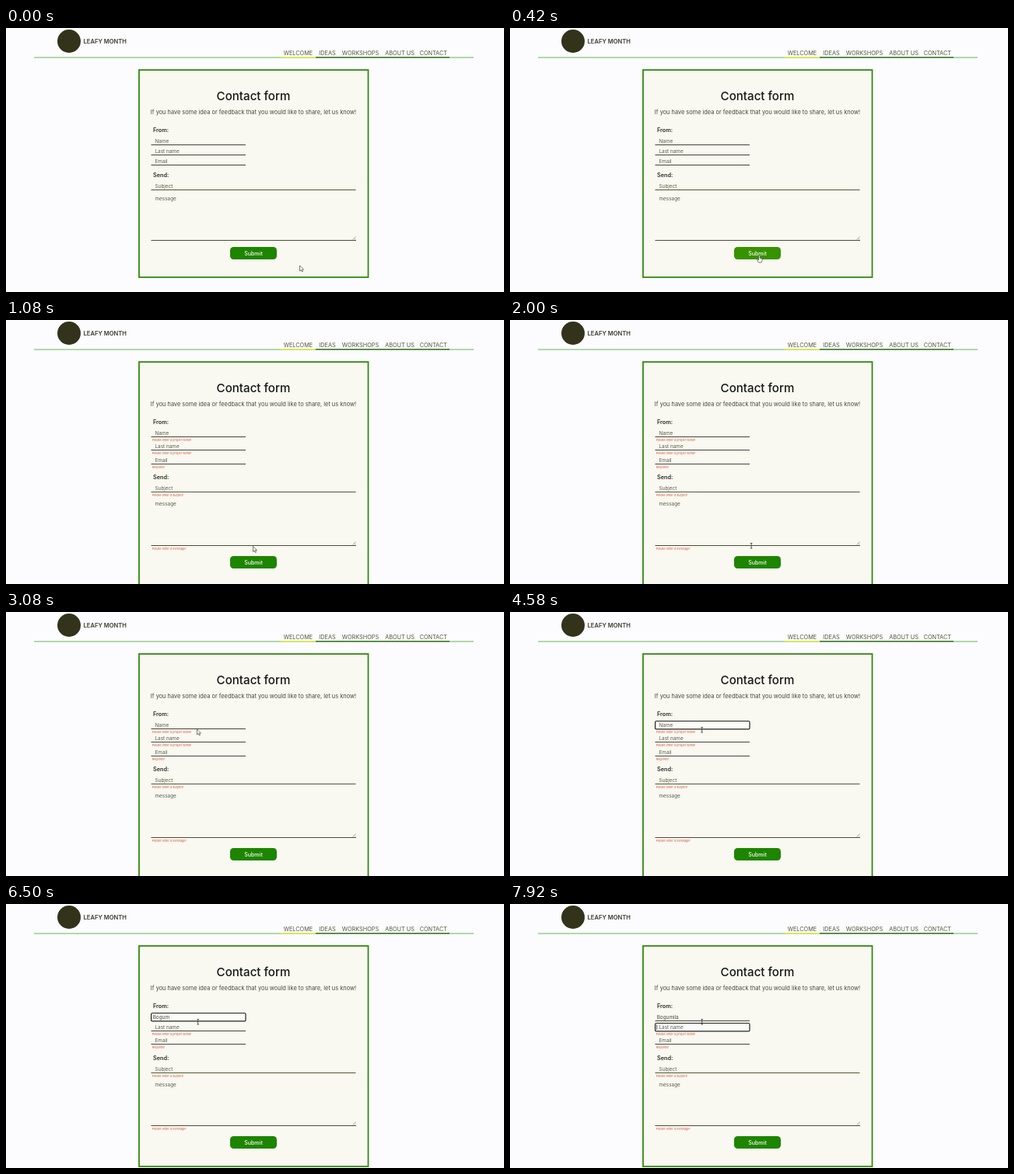
Write an HTML page that moves like this. It is 640 px wide and 340 px high and loops after 8 s.

```html
<!DOCTYPE html>
<html lang="en">
<head>
<meta charset="utf-8">
<title>Contact form</title>
<style>
  html, body { margin: 0; width: 100%; height: 100%; overflow: hidden; background: #fcfcfe; }
  svg { display: block; width: 640px; height: 340px; font-family: Inter, "Open Sans", sans-serif; }
  text { dominant-baseline: central; white-space: pre; }
</style>
</head>
<body>
<svg viewBox="0 0 640 340">
  <circle cx="81" cy="17" r="15" fill="#33331c"/>
  <text x="99.5" y="17.5" font-size="7.6" font-weight="600" fill="#3a3a30">LEAFY MONTH</text>
  <path d="M36 38H601" stroke="#6ab55c" stroke-width="1.2"/>
  <path d="M353 37.7H398" stroke="#e0f03c" stroke-width="1.6"/>
  <path d="M398 37.7H570" stroke="#3f7a2a" stroke-width="1.4"/>
  <g id="nav" font-size="7.3" fill="#55553c"></g>
  <g id="form"></g>
</svg>
<script>
const LOOP = 8000;
const ERROR_HEIGHT = 4.3;
const SUBMIT = 910, FOCUS_NAME = 3990, VALID = 5320, FOCUS_LAST = 7570;
const NAME = 'Bogumila';
const KEYS = [5160, 5320, 5570, 5820, 6490, 6660, 6740, 6820];

// time, x, y of the pointer
const PATH = [
  [0, 377.5, 306], [80, 377.5, 306], [400, 320.5, 293], [920, 317.5, 291.5],
  [1500, 317.5, 291.5], [1800, 316, 306], [2250, 302, 262], [2580, 286, 224],
  [2830, 286, 224], [3080, 245.5, 151], [3580, 245.5, 151], [3830, 246.7, 148.5],
  [LOOP, 246.7, 148.5]
];

const text = (x, y, str, size, fill, more = '') =>
  `<text x="${x}" y="${y}" font-size="${size}" fill="${fill}" ${more}>${str}</text>`;
const line = (x1, x2, y, color) =>
  `<path d="M${x1} ${y}H${x2}" stroke="${color}" stroke-width="1.2"/>`;
const snap = y => Math.floor(y) + .5;
const middle = 'text-anchor="middle"';
const strong = 'font-weight="600"';

document.getElementById('nav').innerHTML = [
  [375.5, 'WELCOME'], [413, 'IDEAS'], [455.5, 'WORKSHOPS'], [506, 'ABOUT US'], [549.3, 'CONTACT']
].map(([x, label]) => `<text x="${x}" y="32.7" ${middle}>${label}</text>`).join('');

function pointer(t) {
  const i = Math.max(1, PATH.findIndex(p => p[0] > t));
  const [t0, x0, y0] = PATH[i - 1], [t1, x1, y1] = PATH[i];
  const k = (t - t0) / (t1 - t0), ease = k * k * (3 - 2 * k);
  return [x0 + (x1 - x0) * ease, y0 + (y1 - y0) * ease];
}

function cursor(x, y, kind) {
  const shape = {
    arrow: '<path d="M0 0V7L1.7 5.5 2.9 8 4 7.5 2.9 5.1H5Z" fill="#fff" stroke="#444" stroke-width=".7"/>',
    hand: '<path d="M-.8 .6Q0-.5 .8 .6V3.4L3.6 4.2V6.5L2.6 9H-1L-3 5.8Q-2.7 4.6-.8 5.8Z" fill="#fff" stroke="#444" stroke-width=".7"/>',
    beam: '<path d="M-1.3 0H1.3M0 0V6.5M-1.3 6.5H1.3" fill="none" stroke="#333" stroke-width=".8"/>'
  }[kind];
  return `<g transform="translate(${x} ${y})">${shape}</g>`;
}

function draw(t) {
  const failed = t >= SUBMIT, valid = t >= VALID;
  const typed = NAME.slice(0, KEYS.filter(k => t >= k).length);
  const focus = t >= FOCUS_LAST ? 1 : t >= FOCUS_NAME ? 0 : -1;
  const since = t - (focus ? FOCUS_LAST : FOCUS_NAME);
  let shift = 0, out = '';

  const error = (y, msg) => {
    out += text(187.8, y + 4, msg, 3.75, '#d8503c', 'font-style="italic"');
    shift += ERROR_HEIGHT;
  };
  const field = (i, base, hint, msg, value = '') => {
    const y = snap(base + shift);
    out += line(186.5, i < 3 ? 308 : 449.5, y, i < 3 ? '#444438' : '#4c5a30');
    if (focus === i) {
      out += `<rect x="186.6" y="${y - 10}" width="121.4" height="10.4" rx="1.5" fill="#fcfcf8" stroke="#222" stroke-width="1.2"/>`;
      if (!value && since % 1000 < 500) out += `<path d="M188.7 ${y - 8.2}v6.6" stroke="#222" stroke-width=".7"/>`;
    }
    out += value ? text(188.7, y - 5, value, 6.4, '#4a4a40') : text(191.5, y - 5, hint, 6.4, '#5c5c50');
    if (failed && !(i === 0 && valid)) error(y, msg);
  };

  const proper = 'Please enter a proper name!';
  field(0, 150.5, 'Name', proper, typed);
  field(1, 163.5, 'Last name', proper);
  field(2, 176.5, 'Email', 'Required');
  out += text(189, 189.5 + shift, 'Send:', 7.3, '#2c2c24', strong);
  field(3, 208.7, 'Subject', 'Please enter a subject!');
  out += text(191.5, 219.6 + shift, 'message', 6.4, '#5c5c50');
  const end = snap(273 + shift);
  out += line(186.5, 450, end, '#4a4e38') +
    `<path d="M445.5 ${end - 1}l4-4M447.7 ${end - 1}l1.8-1.8" stroke="#777" stroke-width=".6"/>`;
  if (failed) error(end, 'Please enter a message!');

  const [px, py] = pointer(t);
  const top = Math.round(282 + shift);
  const hover = px > 288 && px < 348 && py > top && py < top + 16;
  out += `<rect x="288" y="${top}" width="60" height="16" rx="4.5" fill="${hover ? '#379200' : '#1d8500'}"/>` +
    text(318, top + 8.1, 'Submit', 7.1, '#fcfcee', middle + ' font-weight="500"');

  const inMessage = py > 211 + shift && py < end;
  const overName = py < 150.5;
  const kind = hover ? 'hand' : overName || inMessage ? 'beam' : 'arrow';

  document.getElementById('form').innerHTML =
    `<rect x="171" y="54" width="294.5" height="${Math.round(266.5 + shift)}" fill="#f9f9f1" stroke="#34890f" stroke-width="1.8"/>` +
    text(318, 87, 'Contact form', 15.1, '#151515', middle + ' font-weight="500"') +
    text(318, 108.7, 'If you have some idea or feedback that you would like to share, let us know!', 7.4, '#484840', middle) +
    text(189, 131.5, 'From:', 7.3, '#2c2c24', strong) +
    out + cursor(px, py, kind);
}

function tick(now) {
  draw(now % LOOP);
  requestAnimationFrame(tick);
}
draw(0);
requestAnimationFrame(tick);
</script>
</body>
</html>
```
